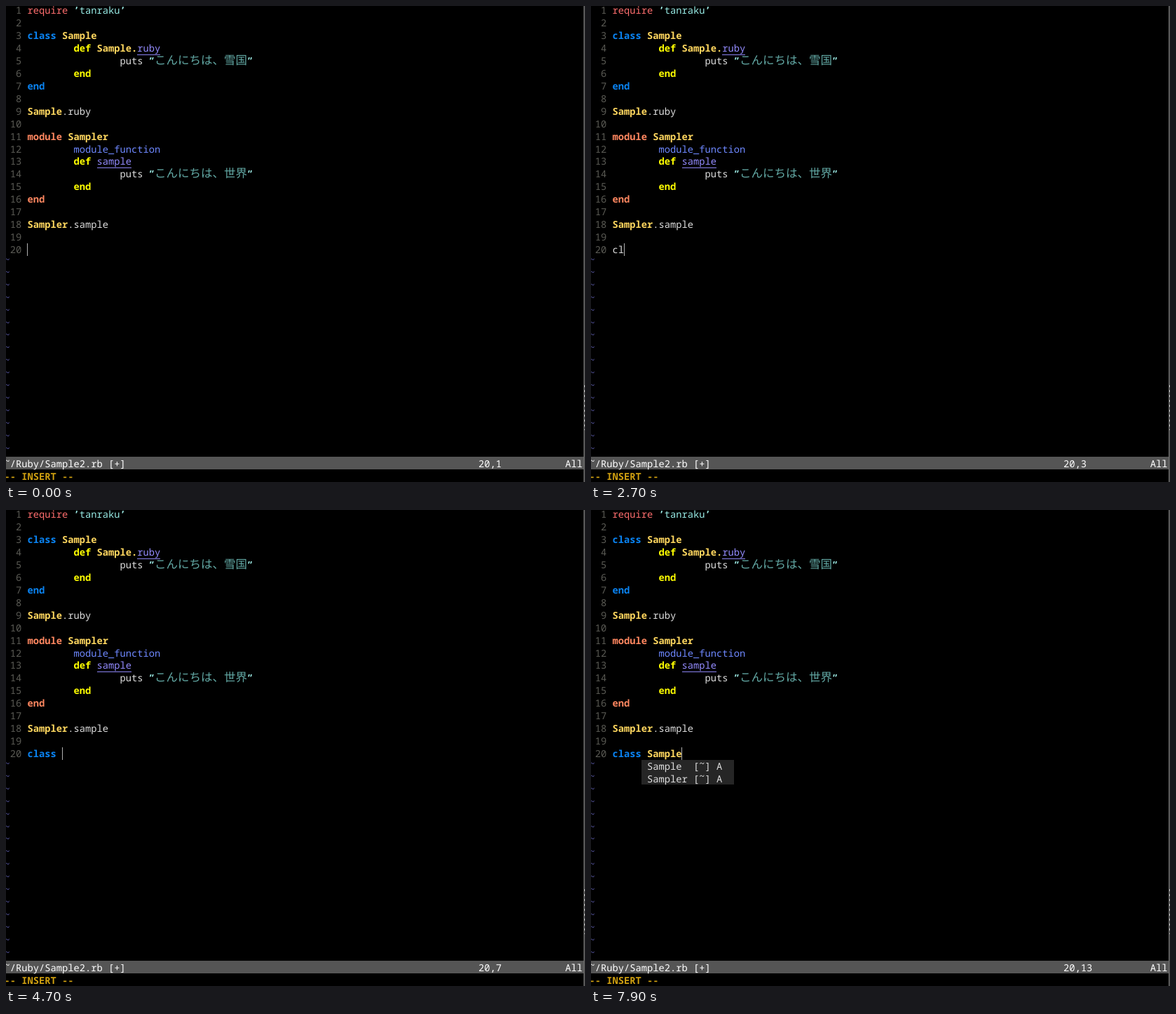
Animation, 826 px wide and 678 px high, one loop 8 s. Source, as an HTML page:

```html
<!DOCTYPE html>
<html lang="ja">
<head>
<meta charset="utf-8">
<title>Editor session</title>
<style>
  html, body { margin: 0; width: 100%; height: 100%; overflow: hidden; background: #000; }
  svg { display: block; }
  text {
    font: 13.75px "Noto Sans Mono", "DejaVu Sans Mono", monospace;
    text-rendering: geometricPrecision;
    white-space: pre;
    fill: #dedede;
  }
  rect { shape-rendering: crispEdges; }
  .num { fill: #5a5a54; }
  .tilde { fill: #5656a0; }
  .req { fill: #ff6e6e; }
  .str { fill: #98ece6; }
  .quote { fill: #a0f0ea; font-weight: 700; }
  .jp { font: 300 16.5px "Noto Sans CJK JP", "Noto Sans CJK", sans-serif; fill: #62a8a4; }
  .class { fill: #0a84f4; font-weight: 700; }
  .name { fill: #ffd75f; font-weight: 700; }
  .def { fill: #ffff00; font-weight: 700; }
  .module { fill: #ff8760; font-weight: 700; }
  .call { fill: #6e88ff; }
  .method { fill: #948cff; }
  .status { fill: #fff; }
  .mode { fill: #d0a010; font-weight: 700; }
</style>
</head>
<body>
<svg id="stage" width="826" height="678" viewBox="0 0 826 678">
  <rect width="826" height="678"/>
</svg>
<script>
const NS = 'http://www.w3.org/2000/svg';
const stage = document.getElementById('stage');
const CELL = 8.25, LINE = 17.93, LEFT = -2.5, TOP = -3, BASE = 11.3;
const DURATION = 8000;
const INPUT_ROW = 19, INPUT_COL = 4, STATUS_ROW = 36;

const colX = col => LEFT + col * CELL;
const rowY = row => TOP + row * LINE;

function add(parent, tag, attrs, content) {
  const el = document.createElementNS(NS, tag);
  for (const key in attrs) el.setAttribute(key, attrs[key]);
  if (content) el.textContent = content;
  return parent.appendChild(el);
}

function box(parent, x, y, width, height, fill) {
  return add(parent, 'rect', { x, y, width, height, fill });
}

// Tildes sit high in their cell.
function put(parent, row, col, str, cls = '') {
  for (const part of str.split(/(~)/)) {
    if (!part) continue;
    const y = BASE + row * LINE - (part === '~' ? 4 : 0);
    add(parent, 'text', { x: colX(col), y, class: cls }, part);
    col += part.length;
  }
}

// Segments are [text, class]; wide glyphs take two cells.
function putLine(parent, row, col, segments) {
  for (const [str, cls] of segments) {
    put(parent, row, col, str, cls);
    const width = str.length * (cls === 'jp' ? 2 : 1);
    if (cls === 'method') {
      box(parent, colX(col), Math.round(BASE + row * LINE + 3.5), width * CELL, 1, '#8a82f0');
    }
    col += width;
  }
}

const greet = word => [['puts '], ['”', 'quote'], ['こんにちは、' + word, 'jp'], ['”', 'quote']];

// [row, indent in tabs, segments]
const code = [
  [0, 0, [['require ', 'req'], ['’', 'quote'], ['tanraku', 'str'], ['’', 'quote']]],
  [2, 0, [['class ', 'class'], ['Sample', 'name']]],
  [3, 1, [['def ', 'def'], ['Sample.', 'name'], ['ruby', 'method']]],
  [4, 2, greet('雪国')],
  [5, 1, [['end', 'def']]],
  [6, 0, [['end', 'class']]],
  [8, 0, [['Sample', 'name'], ['.ruby']]],
  [10, 0, [['module ', 'module'], ['Sampler', 'name']]],
  [11, 1, [['module_function', 'call']]],
  [12, 1, [['def ', 'def'], ['sample', 'method']]],
  [13, 2, greet('世界')],
  [14, 1, [['end', 'def']]],
  [15, 0, [['end', 'module']]],
  [17, 0, [['Sampler', 'name'], ['.sample']]]
];

function drawScreen() {
  for (let row = 0; row < 20; row++) {
    const num = String(row + 1);
    put(stage, row, 3 - num.length, num, 'num');
  }
  for (let row = 20; row < STATUS_ROW; row++) put(stage, row, 0, '~', 'tilde');
  for (const [row, tabs, segments] of code) putLine(stage, row, INPUT_COL + tabs * 8, segments);

  box(stage, 0, 642, 824, 18, '#555');
  put(stage, STATUS_ROW, 0, '~/Ruby/Sample2.rb [+]', 'status');
  put(stage, STATUS_ROW, 97, 'All', 'status');
  put(stage, STATUS_ROW + 1, 0, '-- INSERT --', 'mode');

  // Window edge
  box(stage, 824, 0, 1, 678, '#707070');
  box(stage, 825, 0, 1, 678, '#484848');
  add(stage, 'path', { d: 'M825.5 540V604', stroke: '#bbb', 'stroke-dasharray': '3 4' });
}

function drawPopup(parent, col, words) {
  const width = Math.max(...words.map(w => w.length)) + 1;
  const y = Math.round(rowY(INPUT_ROW + 1));
  const bottom = Math.round(rowY(INPUT_ROW + 1 + words.length));
  box(parent, Math.round(colX(col - 1)), y, 16 * CELL, bottom - y, '#262626');
  words.forEach((word, i) => {
    const row = INPUT_ROW + 1 + i;
    put(parent, row, col, word);
    put(parent, row, col + width, '[~] A');
  });
}

// Time of each keystroke
const typed = 'class Sample';
const keyTimes = [1800, 2300, 2900, 3600, 4000, 4700, 5600, 6100, 6800, 7100, 7300, 7700];

function popupWords(count) {
  if (count >= 3 && count <= 5) return ['class'];
  if (count === 8) return ['Sample', 'Sa', 'Sampler'];
  return count > 8 ? ['Sample', 'Sampler'] : [];
}

function drawInput(layer, count) {
  layer.replaceChildren();
  const str = typed.slice(0, count);
  putLine(layer, INPUT_ROW, INPUT_COL, count < 5
    ? [[str]]
    : [[str.slice(0, 6), 'class'], [str.slice(6), 'name']]);
  const words = popupWords(count);
  if (words.length) drawPopup(layer, INPUT_COL + (count > 6 ? 6 : 0), words);
  box(layer, Math.floor(colX(INPUT_COL + count)), 338, 1, 18, '#b0b0b0');
  put(layer, STATUS_ROW, 82, '20,' + (count + 1), 'status');
}

drawScreen();
const layer = add(stage, 'g', {});
let shown = -1;
const start = performance.now();

function frame() {
  const t = (performance.now() - start) % DURATION;
  const count = keyTimes.filter(k => k <= t).length;
  if (count !== shown) drawInput(layer, shown = count);
  requestAnimationFrame(frame);
}
frame();
</script>
</body>
</html>
```
